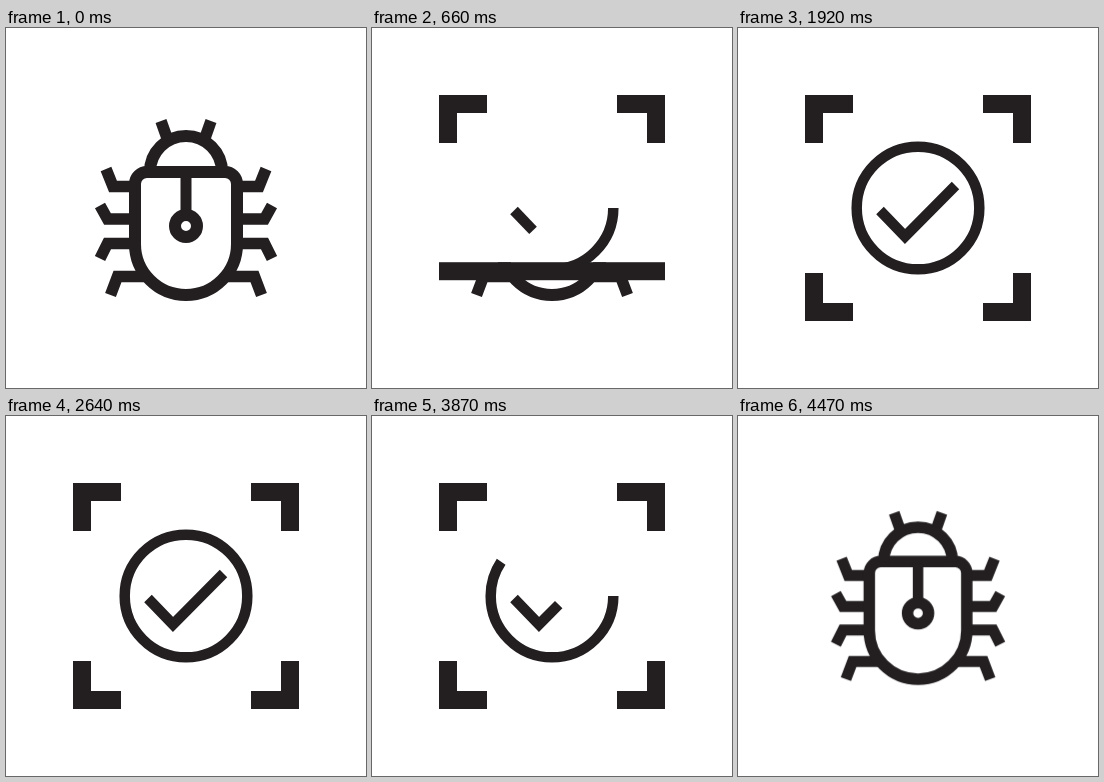
Write an HTML page that moves like this. It is 360 px wide and 360 px high and loops after 4500 ms.

```html
<!DOCTYPE html>
<html lang="en">
<head>
<meta charset="utf-8">
<title>Bug scan</title>
<style>
  html, body { margin: 0; width: 100%; height: 100%; overflow: hidden; background: #fff; }
  svg { display: block; width: 100%; height: 100%; --ink: #231f20; }
  .line { fill: none; stroke: var(--ink); }
  .solid { fill: var(--ink); }

  .scan, .draw, .grow, .frame { animation: 4500ms linear infinite; }
  .scan { animation-name: scan; }
  .draw { animation-name: draw; stroke-dasharray: 1 2; }
  .grow { animation-name: grow; transform-origin: 180px 180px; }
  .frame { animation-name: collapse; }

  /* The bar sweeps down, wiping the bug and uncovering the corners. */
  @keyframes scan {
    0%, .87% { transform: translateY(49px); animation-timing-function: cubic-bezier(.333, .85, .667, 1.01); }
    32.73%, 100% { transform: translateY(293px); }
  }
  @keyframes draw {
    0%, 12.22% { stroke-dashoffset: 1; animation-timing-function: cubic-bezier(.333, 1, .667, 1); }
    38.67%, 66.44% { stroke-dashoffset: 0; animation-timing-function: cubic-bezier(.333, 0, .667, 0); }
    92.89%, 100% { stroke-dashoffset: 1; }
  }
  @keyframes grow {
    0%, 89% { transform: scale(0); animation-timing-function: cubic-bezier(.333, .389, .667, .756); }
    100% { transform: scale(1); }
  }
  /* The corners fold inwards around the growing bug. */
  @keyframes collapse {
    0%, 89.91% {
      d: path("M67 115L67 67L115 67L115 85L85 85L85 115Z M245 67L293 67L293 115L275 115L275 85L245 85Z M67 245L85 245L85 275L115 275L115 293L95 293L67 293Z M293 245L293 293L245 293L245 275L275 275L275 245Z");
      animation-timing-function: cubic-bezier(.333, 0, .667, .333);
    }
    93.333%, 100% {
      d: path("M118 166L118 117L138 98L146 109L131 122L131 166Z M225 108L245 123L245 168L232 168L232 127L218 120Z M123 180L137 180L137 225L152 237L155 249L142 248L123 234Z M242 180L242 245L221 251L218 241L228 237L228 180Z");
    }
    0%, 93.9% { opacity: 1; }
    94%, 100% { opacity: 0; }
  }
</style>
</head>
<body>
<svg viewBox="0 0 360 360">
  <defs>
    <clipPath id="above"><rect class="scan" y="-360" width="360" height="360"/></clipPath>
    <clipPath id="below"><rect class="scan" width="360" height="360"/></clipPath>
    <clipPath id="window"><rect x="67" y="67" width="226" height="226"/></clipPath>

    <g id="side" class="line" stroke-width="11.5">
      <path d="M155 93L161 110"/>
      <path d="M100 141L107 158.5H126"/>
      <path d="M94 177.5L101.500 191H126"/>
      <path d="M94 230.500L101.500 215.500H126"/>
      <path d="M104.500 267L111.500 248.500H143"/>
    </g>
    <g id="bug">
      <use href="#side"/>
      <use href="#side" transform="matrix(-1 0 0 1 360 0)"/>
      <g class="line" stroke-width="12">
        <path d="M129 156A12 12 0 0 1 141 144H219A12 12 0 0 1 231 156V216A51 51 0 0 1 129 216Z"/>
        <path d="M144 144A36 36 0 0 1 216 144"/>
        <path d="M180 146V186" stroke-width="11"/>
        <circle cx="180" cy="198" r="11"/>
      </g>
    </g>
  </defs>

  <g clip-path="url(#below)"><use href="#bug"/></g>
  <g class="grow"><use href="#bug"/></g>

  <g class="line" stroke-width="10.5">
    <circle class="draw" cx="180" cy="180" r="61.3" pathLength="1"/>
    <path class="draw" d="M142 182.500L167 208.500L217.500 157.500" pathLength="1"/>
  </g>

  <g clip-path="url(#above)"><path class="frame solid"/></g>
  <g clip-path="url(#window)"><rect class="scan solid" x="67" width="226" height="18"/></g>
</svg>
</body>
</html>
```
